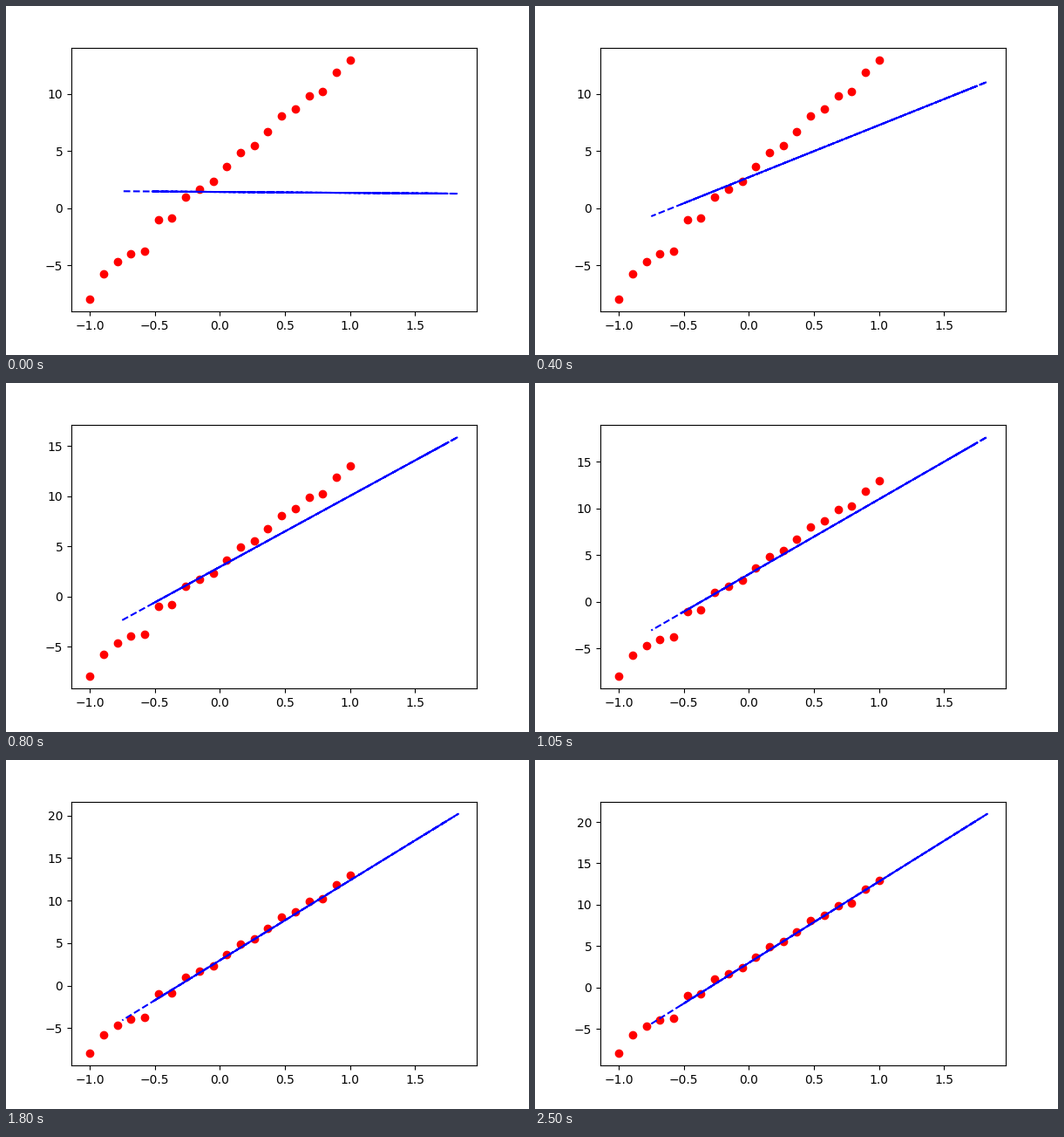
Write a matplotlib script that moves like this. It is 600 px wide and 400 px high and loops after 2.55 s.

```python
import matplotlib.pyplot as plt
import numpy as np
from matplotlib.animation import FuncAnimation

FRAMES = 51
INTERVAL = 50
RATE = 0.1
COUNT = 20

# Samples of y = 10x + 3 with a small ripple and a few outliers
i = np.arange(COUNT)
x = np.linspace(-1, 1, COUNT)
noise = 0.09 - 0.24 * np.cos(2.045 * i)
noise[[0, 4, 17]] -= [0.83, 1.15, 0.97]
noise[[5, 7]] += 0.48
y = 10 * x + 3 + noise

# Unsorted inputs, so the dashed prediction line runs back and forth
x_test = np.array([1.57, 1.75, -0.52, 1.832, -0.751])


def fit(steps, w=-0.082, b=1.43):
    """Slope and offset after some steps of gradient descent."""
    for _ in range(steps):
        error = w * x + b - y
        w, b = w - 2 * RATE * np.mean(error * x), b - 2 * RATE * np.mean(error)
    return w, b


fig, ax = plt.subplots(figsize=(6, 4), dpi=100)
fig.subplots_adjust(left=0.125, right=0.9, bottom=0.125, top=0.88)
ax.plot(x, y, "ro")
line, = ax.plot(x_test, x_test, "b--")


def update(step):
    w, b = fit(step)
    line.set_data(x_test, w * x_test + b)
    ax.relim()
    ax.autoscale_view()
    return line,


anim = FuncAnimation(fig, update, frames=FRAMES, interval=INTERVAL,
                     repeat=True, repeat_delay=0, blit=False)
plt.show()
```
